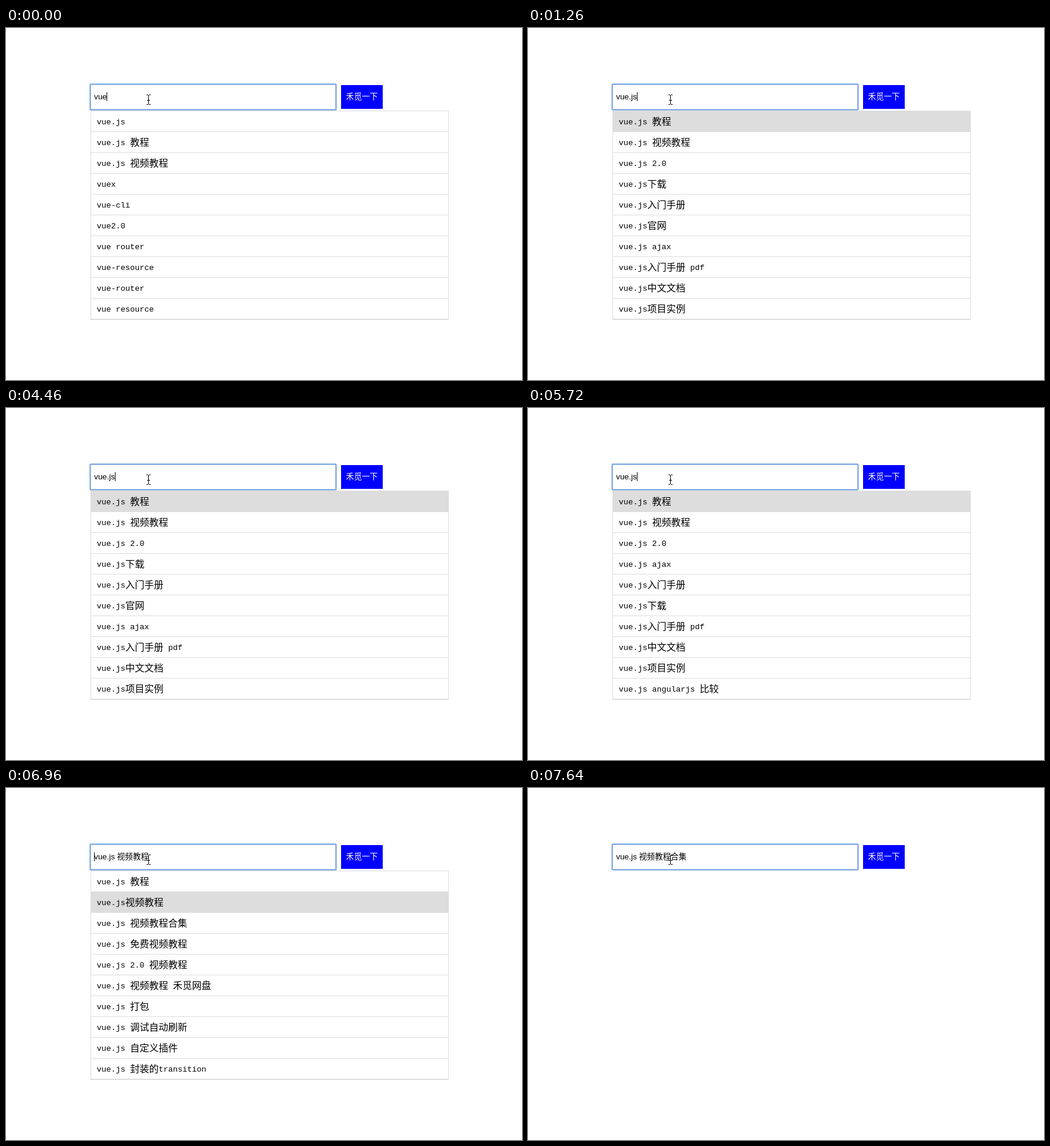
An HTML page for the animation above (8000 ms loop, 867x592 px).

```html
<!DOCTYPE html>
<html lang="zh-CN">
<head>
<meta charset="utf-8">
<style>
html, body { margin: 0; height: 100%; overflow: hidden; background: #fff; }
svg { display: block; }
.field { font: 13.333px Arial, "Liberation Sans", "Noto Sans CJK SC", sans-serif; }
.row { font: 13.333px "Liberation Mono", "Noto Sans CJK SC", monospace; }
.row tspan {
  font: 300 16px "Noto Sans CJK SC Light", "Noto Sans CJK SC", "Noto Sans CJK", sans-serif;
  baseline-shift: -1px;
}
.ring { fill: none; stroke: #5f94dc; }
</style>
</head>
<body>
<svg width="867" height="592" viewBox="0 0 867 592">
  <rect class="ring" x="141.5" y="94.5" width="413" height="43" rx="1" stroke-width="3" opacity=".25"/>
  <rect class="ring" x="141.5" y="94.5" width="413" height="43" rx="1" stroke-width="1.5"/>
  <rect x="563" y="96" width="70" height="40" fill="#00f"/>
  <text class="field" x="598" y="120" text-anchor="middle" fill="#fff">禾觅一下</text>
  <text class="field" id="query" x="148" y="120"></text>
  <rect id="caret" y="108" width="1" height="15"/>
  <path d="M236 112.5h3M240 112.5h3M239.5 113v15M236 128.5h3M240 128.5h3M237 121.5h5" stroke="#000" fill="none"/>
  <g id="list"></g>
</svg>
<script>
const LOOP = 8000;
const $ = id => document.getElementById(id);
const js = names => names.split('|').map(name => 'vue.js' + name);

const lists = {
  vue: ['vue.js', 'vue.js 教程', 'vue.js 视频教程', 'vuex', 'vue-cli', 'vue2.0',
    'vue router', 'vue-resource', 'vue-router', 'vue resource'],
  first: js(' 教程| 视频教程| 2.0|下载|入门手册|官网| ajax|入门手册 pdf|中文文档|项目实例'),
  second: js(' 教程| 视频教程| 2.0| ajax|入门手册|下载|入门手册 pdf|中文文档|项目实例| angularjs 比较'),
  video: js(' 教程|视频教程| 视频教程合集| 免费视频教程| 2.0 视频教程| 视频教程 禾觅网盘' +
    '| 打包| 调试自动刷新| 自定义插件| 封装的transition'),
  none: []
};

// start time, query, list, selected row
const scenes = [
  [0, 'vue', 'vue', -1],
  [1260, 'vue.js', 'first', 0],
  [5720, 'vue.js', 'second', 0],
  [6310, 'vue.js 视频教程', 'second', 1],
  [6430, 'vue.js 视频教程', 'video', 1],
  [7110, 'vue.js 视频教程合集', 'none', -1]
];

// start time, caret x (0 = hidden)
const carets = [
  [0, 169], [400, 0], [980, 169], [1260, 183], [1850, 0], [2290, 183], [2850, 0],
  [3310, 183], [3880, 0], [4460, 183], [4890, 0], [5010, 176], [5570, 183],
  [6310, 240], [6960, 148], [7110, 267], [7640, 0]
];

const at = (steps, t) => steps.filter(step => step[0] <= t).pop();

function drawList(items, selected) {
  if (!items.length) return '';
  const rows = items.map((item, i) => {
    const y = 139 + i * 35;
    const text = item.replace(/[\u4e00-\u9fff]+/g, '<tspan>$&</tspan>');
    return `<rect x="142" y="${y}" width="602" height="${i === selected ? 36 : 1}" fill="#ddd"/>
      <text class="row" x="152.5" y="${y + 23}">${text}</text>`;
  });
  return rows.join('') +
    '<path d="M142.5 139V491M743.5 139V491" stroke="#ddd"/>' +
    '<rect x="142" y="489" width="602" height="2" fill="#ddd"/>';
}

let shown;
function frame(now) {
  const t = now % LOOP;
  const scene = at(scenes, t);
  if (scene !== shown) {
    shown = scene;
    const [, query, list, selected] = scene;
    $('query').textContent = query;
    $('list').innerHTML = drawList(lists[list], selected);
  }
  const x = at(carets, t)[1];
  $('caret').setAttribute('x', x);
  $('caret').setAttribute('visibility', x ? 'visible' : 'hidden');
  requestAnimationFrame(frame);
}
frame(0);
</script>
</body>
</html>
```
